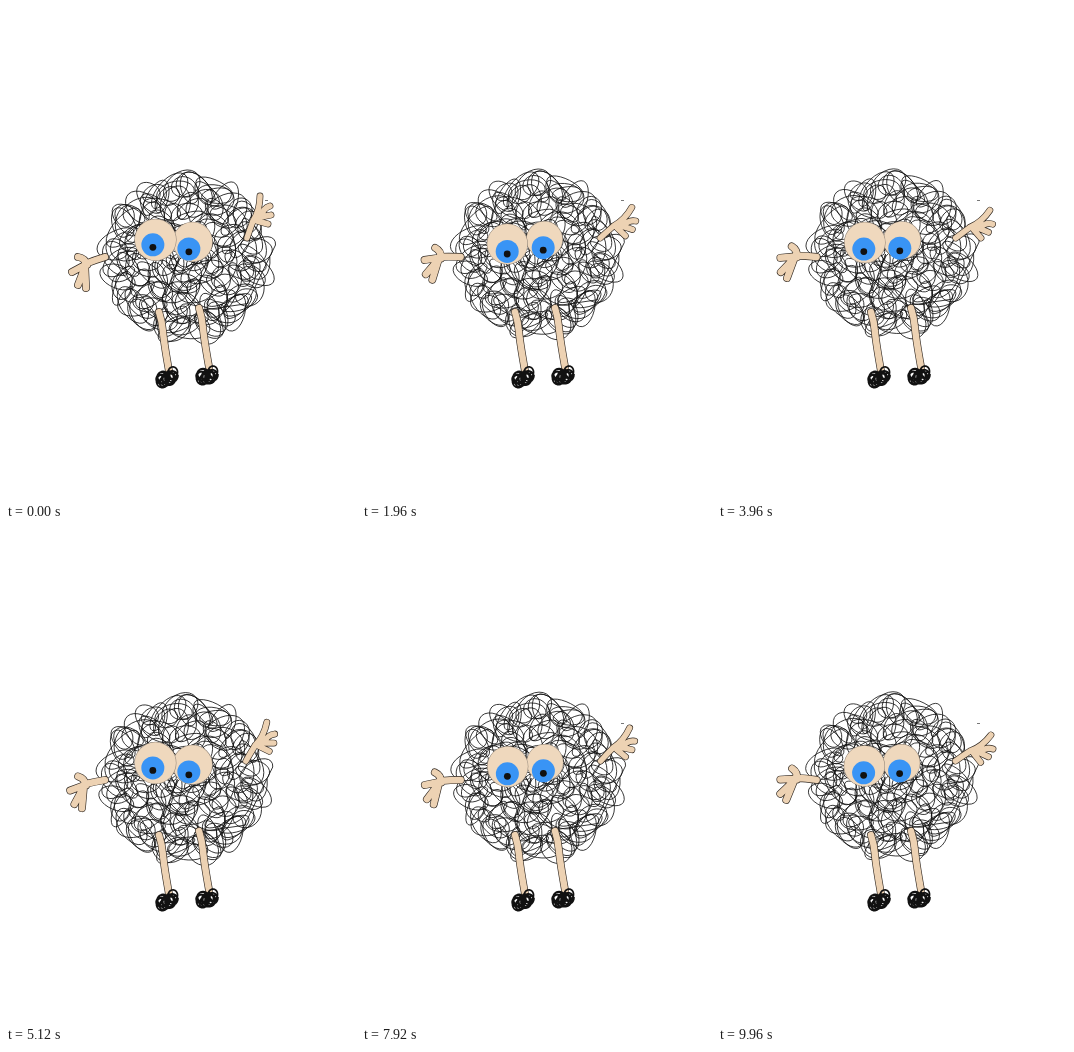
An HTML page with a canvas that plays this animation: 350x495 px, repeating every 10000 ms.

```html
<!DOCTYPE html>
<html lang="en">
<head>
<meta charset="utf-8">
<title>Scribble creature</title>
<style>
html, body { margin: 0; height: 100%; overflow: hidden; background: #fff; }
canvas { display: block; }
</style>
</head>
<body>
<canvas id="stage" width="350" height="495"></canvas>
<script>
const ctx = document.getElementById('stage').getContext('2d');
const LOOP = 10000, SWAY = 6200, TAU = Math.PI * 2;
const SKIN = '#edd2b3', INK = '#111', BLUE = '#3994f5';
const { sin, cos } = Math;

// Curly pen line: loops whose centres travel round nested rings.
function makeScribble() {
  const path = new Path2D();
  const rings = [[71, 42], [67, 31], [54, 34], [39, 27], [23, 17], [9, 8]];
  rings.forEach(([radius, loops], ring) => {
    for (let i = 0; i <= loops * 24; i++) {
      const turn = i / 24, a = turn * TAU;
      const around = turn / loops * TAU + ring * 0.8 + 0.07 * sin(turn * 1.9 + ring);
      const r = radius + 3 * sin(turn * 2.3 + ring) - (ring ? 3 * cos(turn * 1.1) : 0);
      const w = 13 + 3 * sin(turn * 1.7 + ring) + 1.5 * sin(turn * 0.63);
      const h = 13 + 3 * cos(turn * 2.1 + ring * 2) + 1.5 * cos(turn * 0.81);
      path.lineTo(r * cos(around) + w * cos(a), r * sin(around) + h * sin(a + 0.6 * sin(turn)));
    }
  });
  return path;
}
const scribble = makeScribble();

const leg = (x, y) => `M${x} ${y}q3 9 4 20t6 39`;
const legs = [leg(153, 306), leg(193, 302)].map(d => new Path2D(d));

// Arms are drawn relative to the shoulder.
const leftArm = new Path2D(
  'M0 1Q-10 4-20 8M-18 9Q-20 2-27 1M-20 9L-33 16M-20 10Q-23 19-27 29M-20 10L-19 32');
const rightArm = new Path2D(
  'M0 0Q3-9 6-17M6-17Q13-28 13-42M6-17L14-21M14-21Q16-30 23-32M14-21L24-23M10-17L21-14');

function shoe(x, y, lean) {
  const path = new Path2D();
  for (let i = 0; i <= 260; i++) {
    const a = i * 0.31, drift = i * 0.047;
    const across = 6 * cos(drift);
    path.lineTo(x + across + 5 * cos(a), y - lean * across + 3 * sin(drift * 1.7) + 5.5 * sin(a));
  }
  return path;
}
const shoes = [shoe(161, 372, 0.45), shoe(201, 370, 0.25)];

function line(path, width, color) {
  ctx.lineWidth = width;
  ctx.strokeStyle = color;
  ctx.stroke(path);
}

function limb(path, width) {
  line(path, width + 1.3, '#332b24');
  line(path, width, SKIN);
}

function arm(path, x, y, degrees, width) {
  ctx.save();
  ctx.translate(x, y);
  ctx.rotate(degrees * Math.PI / 180);
  limb(path, width);
  ctx.restore();
}

function disc(x, y, r, color) {
  ctx.beginPath();
  ctx.arc(x, y, r, 0, TAU);
  ctx.fillStyle = color;
  ctx.fill();
}

function eyeball(x, y, r) {
  disc(x, y, r, '#8d8175');
  disc(x, y, r - 0.5, '#efd8bd');
}

function iris(x, y, pupilY) {
  disc(x, y, 11.5, BLUE);
  disc(x, pupilY, 3.4, INK);
}

function draw(t) {
  const lift = cos(t / SWAY * TAU);          // 1: right arm up, -1: down
  const gaze = cos((t + 500) / SWAY * TAU);  // eyes lead the arms
  const drop = (1 - lift) / 2;
  ctx.clearRect(0, 0, 350, 495);
  ctx.lineCap = ctx.lineJoin = 'round';

  ctx.save();
  ctx.translate(176.5 + 3.5 * lift, 249.5 + 2 * lift);
  ctx.scale(0.98 + 0.018 * lift, 0.985 + 0.015 * lift);
  line(scribble, 0.85, INK);
  ctx.restore();

  legs.forEach(path => limb(path, 6.5));
  shoes.forEach(path => line(path, 1.7, INK));
  ctx.fillStyle = '#777';
  ctx.fillRect(259, 194, 3, 1);
  arm(leftArm, 99, 250, 28 * drop, 6.5);
  arm(rightArm, 241 - 4 * drop, 232, 41 * drop, 5.5);

  eyeball(184.5 + 2.5 * gaze, 234.5 + 1.5 * gaze, 19.2 + gaze);
  iris(182 + gaze, 242.3 + 0.8 * gaze, 245 + gaze);
  eyeball(147.3 + 2.5 * gaze, 236 - 2.5 * gaze, 20.8 + 0.3 * gaze);
  iris(146 + gaze, 242.3 - 4 * gaze, 244.8 - 4 * gaze);
}

function frame() {
  draw(Math.floor(performance.now() % LOOP / 40) * 40);
  requestAnimationFrame(frame);
}
frame();
</script>
</body>
</html>
```
